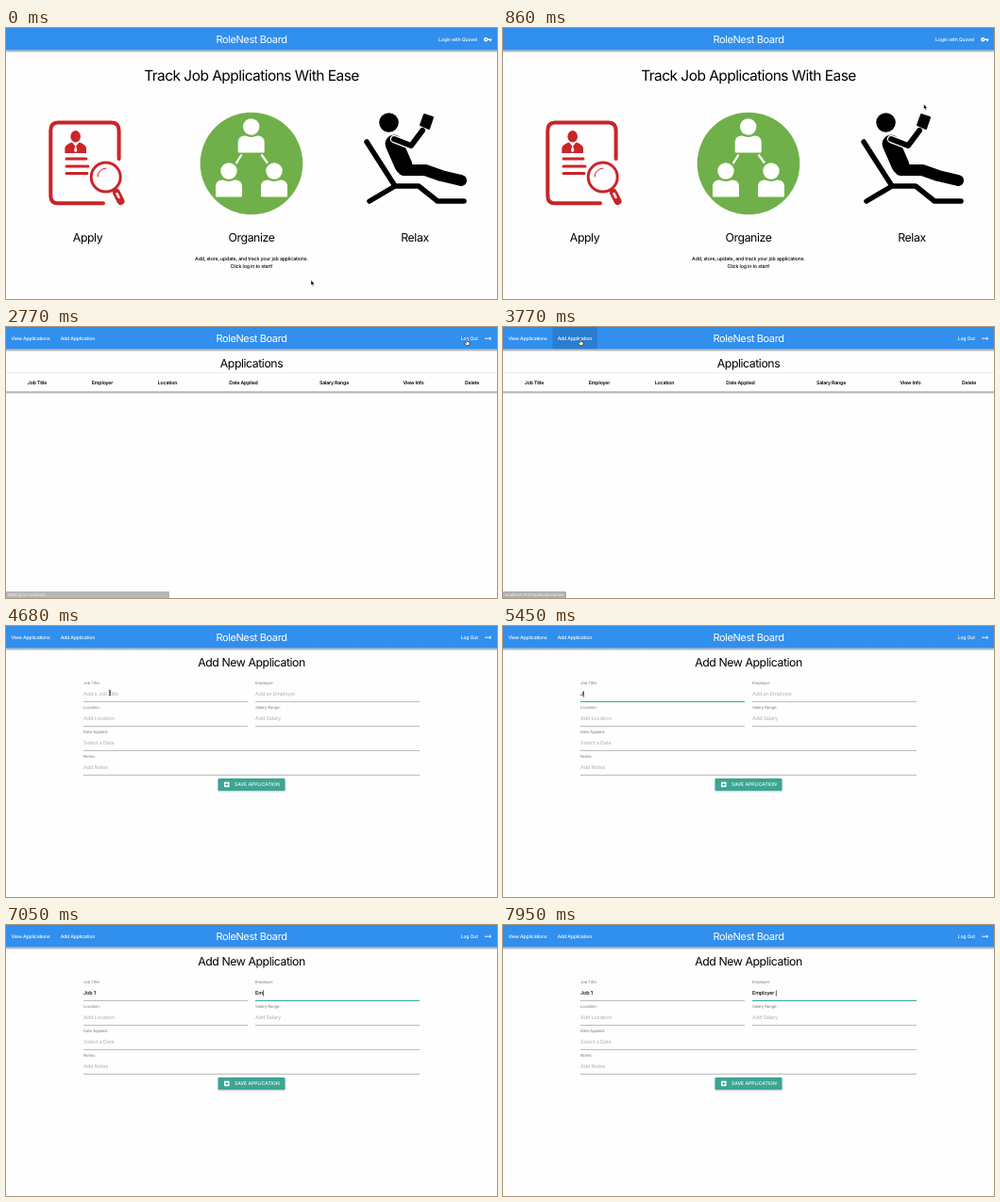
These frames come from a looping animation (520x288 px, 8 s). An HTML page:

```html
<!DOCTYPE html>
<html lang="en">
<head>
<meta charset="utf-8">
<title>Job application tracker demo</title>
<style>
  html, body { margin: 0; width: 100%; height: 100%; overflow: hidden; background: #fefefe; }
  svg { display: block; width: 520px; height: 288px; }
  text {
    font: 500 5.1px Inter, Roboto, sans-serif;
    letter-spacing: -.03em;
    text-rendering: geometricPrecision;
    white-space: pre;
  }
  .mid { text-anchor: middle; }
  .h3, .h4, .brand { font-weight: 400; letter-spacing: -.035em; }
  .h3 { font-size: 15.5px; }
  .h4 { font-size: 12.3px; }
  .brand { font-size: 11px; }
  .white { fill: #fff; }
  .intro { font-size: 5.25px; }
  .th { font-weight: 600; font-size: 5.2px; }
  .label { font-size: 4.3px; fill: #8e8e8e; }
  .input { font-size: 5.5px; }
  .button { font-size: 5.05px; letter-spacing: 0; fill: #fff; }
  .status { font-size: 4.3px; font-weight: 400; fill: #ddd; }
</style>
</head>
<body>
<svg viewBox="0 0 520 288">
  <defs>
    <linearGradient id="shade" x2="0" y2="1">
      <stop stop-color="#000" stop-opacity=".4"/>
      <stop offset="1" stop-color="#000" stop-opacity="0"/>
    </linearGradient>
    <g id="person" fill="#fff">
      <path d="M-14 26.5V17Q-14 9.500-7 9.500H7Q14 9.500 14 17V26.500Q14 27.500 13 27.500H-13Q-14 27.500-14 26.500Z"/>
      <circle r="9.800" stroke="#70b04b" stroke-width="2.200"/>
    </g>
  </defs>
  <rect width="520" height="288" fill="#fefefe"/>

  <rect y="23.5" width="520" height="3" fill="url(#shade)"/>
  <rect width="520" height="23.5" fill="#318fee"/>
  <rect id="hover" height="23.5" fill="#000" opacity=".13"/>
  <text class="brand mid white" x="260" y="16">RoleNest Board</text>

  <g id="landing">
    <text class="white" x="458" y="13.9">Login with Quovel</text>
    <g fill="none" stroke="#fff" stroke-width="1.4">
      <circle cx="508.2" cy="12.2" r="1.5"/>
      <path d="M509.7 12.2H514.3M513 12.2V14.2"/>
    </g>
    <text class="h3 mid" x="260" y="56.3">Track Job Applications With Ease</text>

    <g fill="none" stroke="#ca2428" stroke-width="4" stroke-linecap="round">
      <path d="M103 186.3H55Q47.300 186.300 47.300 178V109Q47.300 100.500 55 100.500H112Q119.600 100.500 119.600 109V139"/>
      <path d="M64 139H85M64 147H87M64 154.500H86" stroke-width="3"/>
      <circle cx="105.700" cy="158.500" r="18.500" fill="#fefefe" stroke="none"/>
      <circle cx="105.700" cy="158.500" r="15.500" stroke-width="3"/>
      <path d="M97 158A9 9 0 0 1 106 149" stroke-width="1"/>
      <path d="M117 175L121.500 184" stroke-width="8"/>
      <path d="M117.500 176L119.500 180" stroke="#fefefe" stroke-width="2.500"/>
    </g>
    <g fill="#ca2428">
      <ellipse cx="73.700" cy="115.300" rx="5.300" ry="6.200"/>
      <path d="M62.300 133V128Q62.300 124 70 121.500L73.700 126L77.500 121.500Q85 124 85 128V133Z"/>
      <path d="M73.700 124L72 130L73.700 132.500L75.400 130Z" fill="#fefefe"/>
    </g>

    <circle cx="260" cy="144" r="54.3" fill="#70b04b"/>
    <path d="M249.500 134.500L243 145M270.500 134.500L278 145" stroke="#fff" stroke-width="2.300"/>
    <use href="#person" x="259.700" y="105"/>
    <use href="#person" x="236" y="152"/>
    <use href="#person" x="284" y="152"/>

    <g fill="none" stroke="#000" stroke-linecap="round" stroke-linejoin="round">
      <circle cx="405.500" cy="100.500" r="10.300" fill="#000" stroke="none"/>
      <path d="M382 121L412 168H437L457 184H485M412 168L385 184" stroke-width="5.500"/>
      <path d="M411 123L421 146" stroke-width="19"/>
      <path d="M421 151L444 151L461 157L482 162" stroke-width="12"/>
      <path id="arm" d="M411 118L429 125L441 109" stroke="#fefefe" stroke-width="8.500"/>
      <path d="M411 118L429 125L441 109" stroke-width="6"/>
      <path d="M443 92L452 95L448 107L439 103Z" fill="#000" stroke-width="2"/>
    </g>

    <text class="h4 mid" x="86.500" y="227">Apply</text>
    <text class="h4 mid" x="260" y="227">Organize</text>
    <text class="h4 mid" x="433" y="227">Relax</text>
    <text class="intro mid" x="260" y="247">Add, store, update, and track your job applications.</text>
    <text class="intro mid" x="260" y="255">Click log in to start!</text>
  </g>

  <g id="member">
    <text class="white" x="5.500" y="13.900">View Applications</text>
    <text class="white" x="57.700" y="13.900">Add Application</text>
    <text class="white" x="481.700" y="13.900">Log Out</text>
    <path d="M507 12.200H513.500M512 10.700L513.700 12.200L512 13.700" fill="none" stroke="#fff" stroke-width=".9"/>
  </g>

  <g id="list">
    <text class="h4 mid" x="260" y="43.200">Applications</text>
    <rect y="48.500" width="520" height=".6" fill="#ddd"/>
    <rect y="68.500" width="520" height="3" fill="url(#shade)"/>
    <g id="headers"></g>
  </g>

  <g id="form">
    <text class="h4 mid" x="260" y="43.200">Add New Application</text>
    <g id="fields"></g>
    <rect x="224.500" y="163" width="71.500" height="13.500" rx="1" fill="#000" opacity=".15"/>
    <rect x="224.500" y="162" width="71" height="13" rx="1" fill="#3ca593"/>
    <rect x="231" y="165.700" width="5.600" height="5.600" rx=".7" fill="#fff"/>
    <path d="M232 168.500H235.600M233.800 166.700V170.300" stroke="#3ca593" stroke-width=".9"/>
    <text class="button" x="242" y="170.300">SAVE APPLICATION</text>
    <rect id="caret" width=".6" height="6.500"/>
  </g>

  <g id="status">
    <rect id="statusBox" y="281" height="8" rx="1" fill="#3c3c3c"/>
    <text id="statusText" class="status" x="2" y="286"></text>
  </g>

  <g id="pointer" stroke-linejoin="round">
    <path id="arrow" d="M0 0V5.300L1.200 4.200L2.100 6.200L3 5.800L2.200 3.900H3.800Z" stroke="#fff" stroke-width=".4"/>
    <path id="hand" d="M-.7 0Q0-.7.600 0V2.200L3 2.900V4.600L2.200 6.300H-.8L-2.600 3.800L-2 3.200L-.7 4Z" fill="#fff" stroke="#000" stroke-width=".5"/>
    <path id="beam" d="M-1.200-2.800Q0-2.800 0-2V2Q0 2.800-1.200 2.800M1.200-2.800Q0-2.800 0-2V2Q0 2.800 1.200 2.800" fill="none" stroke="#222" stroke-width=".7"/>
  </g>
</svg>
<script>
const LOOP = 8000;
const $ = id => document.getElementById(id);
const clamp = v => Math.max(0, Math.min(1, v));
const ease = v => v * v * (3 - 2 * v);
const show = (id, on) => { $(id).style.display = on ? '' : 'none'; };

function add(parent, tag, attrs, content = '') {
  const node = document.createElementNS('http://www.w3.org/2000/svg', tag);
  for (const key in attrs) node.setAttribute(key, attrs[key]);
  node.textContent = content;
  return parent.appendChild(node);
}

const headers = [['Job Title', 33], ['Employer', 102], ['Location', 171], ['Date Applied', 251.5],
  ['Salary Range', 347.5], ['View Info', 431.5], ['Delete', 493.5]];
for (const [name, x] of headers) add($('headers'), 'text', { class: 'th mid', x, y: 61.2 }, name);

function makeField(label, hint, x, y, width) {
  const group = $('fields');
  add(group, 'text', { class: 'label', x, y: y - 18 }, label);
  const input = add(group, 'text', { class: 'input', x, y: y - 5.6 });
  const line = add(group, 'rect', { x, y, width, height: 1 });
  return { hint, x, y, input, line };
}
const job = makeField('Job Title:', 'Add a Job Title', 82, 80, 174);
const employer = makeField('Employer:', 'Add an Employer', 264, 80, 174);
const fields = [job, employer,
  makeField('Location:', 'Add Location', 82, 106, 174),
  makeField('Salary Range:', 'Add Salary', 264, 106, 174),
  makeField('Date Applied:', 'Select a Date', 82, 132, 356),
  makeField('Notes:', 'Add Notes', 82, 158, 356)];

const typed = (word, t, start, step) =>
  word.slice(0, Math.max(0, Math.floor((t - start) / step) + 1));

function drawField(field, value, focused) {
  field.input.textContent = value || field.hint;
  field.input.setAttribute('fill', value ? '#000' : '#bcbcbc');
  field.line.setAttribute('fill', focused ? '#38a79f' : '#bdbdbd');
  if (focused) {
    const width = value ? field.input.getComputedTextLength() : 0;
    $('caret').setAttribute('x', field.x + width + .3);
    $('caret').setAttribute('y', field.y - 10.8);
  }
}

// time, x, y
const pointerPath = [[0, 323, 268], [100, 323, 268], [1250, 490, 13.3], [1900, 490, 13.3],
  [2400, 488, 13.3], [2850, 488, 13.3], [3550, 82, 13.3], [4150, 82, 13.3], [4600, 110, 71], [LOOP, 110, 71]];

function pointerAt(t) {
  const i = pointerPath.findIndex(key => key[0] > t);
  const [t0, x0, y0] = pointerPath[i - 1], [t1, x1, y1] = pointerPath[i];
  const k = ease((t - t0) / (t1 - t0));
  return [x0 + (x1 - x0) * k, y0 + (y1 - y0) * k];
}

// from, to, fade in, fade out, width, text
const messages = [
  [1300, 1900, 200, 50, 58.5, 'localhost:3000/auth/quovel'],
  [1900, 2900, 50, 350, 173, 'Waiting for localhost...'],
  [3650, 4350, 300, 150, 67, 'localhost:3000/applications/new']];

function drawStatus(t) {
  const message = messages.find(m => t >= m[0] && t < m[1]);
  show('status', message);
  if (!message) return;
  const [from, to, fadeIn, fadeOut, width, label] = message;
  $('status').setAttribute('opacity', clamp((t - from) / fadeIn) * clamp((to - t) / fadeOut));
  $('statusBox').setAttribute('width', width);
  $('statusText').textContent = label;
}

function drawPointer(t, page) {
  const [x, y] = pointerAt(t);
  const overLogin = page === 'landing' && x > 453 && y < 23.5;
  const overAdd = page === 'list' && x > 52.5 && x < 100;
  const overLogout = page === 'list' && x > 476;
  const overInput = page === 'form' && y > 62;
  show('hover', overLogin || overAdd);
  $('hover').setAttribute('x', overLogin ? 453 : 52.5);
  $('hover').setAttribute('width', overLogin ? 67 : 47.5);
  const shape = overInput ? 'beam' : overLogin || overAdd || overLogout ? 'hand' : 'arrow';
  for (const name of ['arrow', 'hand', 'beam']) show(name, name === shape);
  show('pointer', t < 5300);
  $('pointer').setAttribute('transform', `translate(${x} ${y})`);
}

function draw(t) {
  const page = t < 2400 ? 'landing' : t < 4200 ? 'list' : 'form';
  for (const name of ['landing', 'list', 'form']) show(name, name === page);
  show('member', page !== 'landing');
  drawStatus(t);
  drawPointer(t, page);
  if (page !== 'form') return;
  const jobFocused = t >= 4950 && t < 6600, employerFocused = t >= 6600;
  for (const field of fields) drawField(field, '', false);
  drawField(job, typed('Job 1', t, 5350, 160), jobFocused);
  drawField(employer, typed('Employer ', t, 6900, 120), employerFocused);
  show('caret', jobFocused || employerFocused);
}

function frame(now) {
  draw(now % LOOP);
  requestAnimationFrame(frame);
}
requestAnimationFrame(frame);
</script>
</body>
</html>
```
